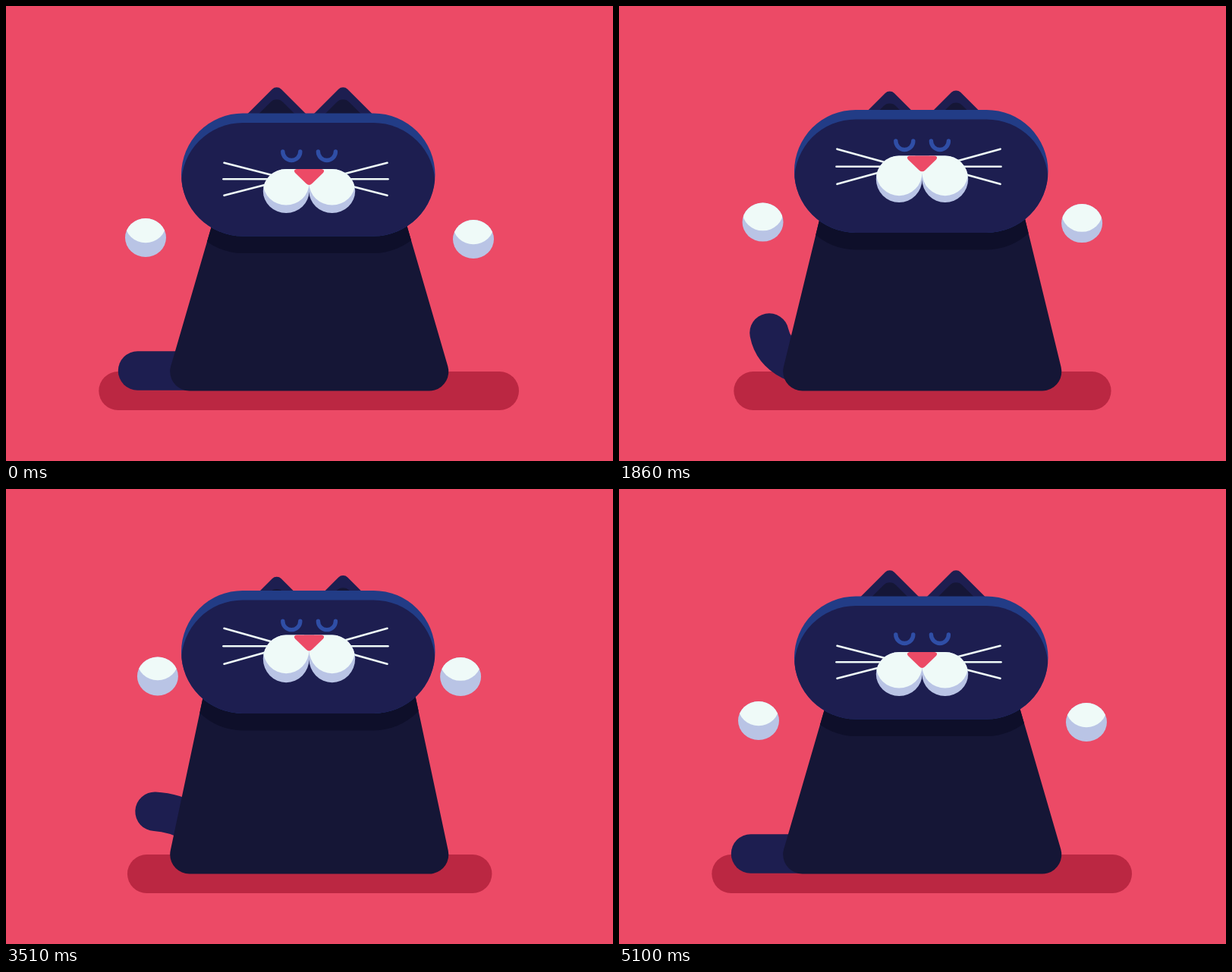
Animation of 800x600 px, one loop 5130 ms. Source, as an HTML page with a canvas:

```html
<!DOCTYPE html>
<html lang="en">
<head>
<meta charset="utf-8">
<title>Meditating cat</title>
<style>
  html, body { margin: 0; width: 100%; height: 100%; overflow: hidden; background: #ec4a66; }
  canvas { display: block; width: 800px; height: 600px; }
</style>
</head>
<body>
<canvas id="stage"></canvas>
<script>
const LOOP = 5130, STEP = 30;
const C = {
  bg: '#ec4a66', floor: '#bb2742', body: '#151636', neck: '#0e0f2a', fur: '#1d1e50',
  rim: '#223c86', eye: '#2f4ea6', white: '#effaf8', lilac: '#b9c4e5'
};

const canvas = document.getElementById('stage');
const g = canvas.getContext('2d');
const ratio = window.devicePixelRatio || 1;
canvas.width = 800 * ratio;
canvas.height = 600 * ratio;

// Eased value between up/down turning points
function track(times, values, t) {
  let i = 0;
  while (i < times.length - 1 && t >= times[i + 1]) i++;
  if (i === times.length - 1) return values[i];
  const u = (t - times[i]) / (times[i + 1] - times[i]);
  return values[i] + (values[i + 1] - values[i]) * u * u * (3 - 2 * u);
}

const BREATH = [0, 1275, 2525, 3745, 4970];
const FACE = [0, 1375, 2595, 3835, 5070];
const PAWS = [0, 1130, 2330, 3630, 4930];
const WAVE = [0, 1, 0, 1, 0];
const FLOOR = [122.3, 162.3, 138, 162.3, 122.3];

const breath = t => track(BREATH, WAVE, t);
const face = t => track(FACE, WAVE, t);
const paws = t => track(PAWS, WAVE, t);
const speed = (fn, t) => (fn(Math.min(t + 10, LOOP)) - fn(Math.max(t - 10, 0))) / 20;

// time, tip x/y, outer handle x/y, inner handle x/y
const TAIL = [
  [0, 173.5, 481, 215, 481, 255, 481],
  [500, 177, 459, 206, 441, 246, 441],
  [990, 198, 419, 238, 424, 270, 450],
  [1400, 207, 410, 221, 440, 245, 472],
  [1860, 198, 431, 204, 462, 235, 481],
  [2370, 174, 467.5, 215, 472.5, 258, 479],
  [2540, 173.5, 476, 215, 477, 256, 480],
  [3060, 176, 459, 205, 440, 245, 440],
  [3540, 197, 425, 234, 427, 262, 449],
  [4020, 203.5, 426, 207, 460, 235, 481],
  [4500, 184, 455, 206, 474, 245, 481],
  [4980, 173.5, 481, 215, 481, 255, 481],
  [5130, 173.5, 481, 215, 481, 255, 481]
];

// Cubic Hermite through the tail poses
function tailPose(t) {
  let i = 0;
  while (i < TAIL.length - 2 && t >= TAIL[i + 1][0]) i++;
  const a = TAIL[i], b = TAIL[i + 1];
  const h = b[0] - a[0], u = (t - a[0]) / h;
  const slope = (k, c) => {
    const p = TAIL[k - 1], n = TAIL[k + 1], m = TAIL[k];
    if (!p || !n || (m[c] - p[c]) * (n[c] - m[c]) <= 0) return 0;
    return (n[c] - p[c]) / (n[0] - p[0]);
  };
  const u2 = u * u, u3 = u2 * u;
  return [1, 2, 3, 4, 5, 6].map(c =>
    a[c] * (2 * u3 - 3 * u2 + 1) + b[c] * (3 * u2 - 2 * u3) +
    slope(i, c) * h * (u3 - 2 * u2 + u) + slope(i + 1, c) * h * (u3 - u2));
}

function shape(color, draw) {
  g.beginPath();
  draw();
  g.fillStyle = color;
  g.fill();
}

function clipped(clip, draw) {
  g.save();
  g.beginPath();
  clip();
  g.clip();
  draw();
  g.restore();
}

function line(color, width, draw) {
  g.beginPath();
  draw();
  g.strokeStyle = color;
  g.lineWidth = width;
  g.lineCap = 'round';
  g.stroke();
}

function capsule(x1, y1, x2, y2) {
  const r = (y2 - y1) / 2, y = y1 + r;
  g.moveTo(x1 + r, y1);
  g.lineTo(x2 - r, y1);
  g.arc(x2 - r, y, r, -Math.PI / 2, Math.PI / 2);
  g.lineTo(x1 + r, y2);
  g.arc(x1 + r, y, r, Math.PI / 2, Math.PI * 1.5);
  g.closePath();
}

function oval(x, y, rx, ry) {
  g.moveTo(x + rx, y);
  g.ellipse(x, y, rx, ry, 0, 0, Math.PI * 2);
}

function drawFloor(t) {
  const left = track(BREATH, FLOOR, t);
  shape(C.floor, () => capsule(left, 482, 676 - 0.945 * (left - 122.3), 533));
}

function drawTail(t) {
  const [x, y, ax, ay, bx, by] = tailPose(t);
  line(C.fur, 51.5, () => {
    g.moveTo(x, y);
    g.bezierCurveTo(ax, ay, bx, by, 300, 481);
  });
}

function drawBody(p, headTop) {
  const lean = Math.atan(0.291 - 0.087 * p), r = 25.5, cy = 482, top = 220;
  const tx = 241.7 - r * Math.cos(lean), ty = cy - r * Math.sin(lean);
  const topX = tx + (ty - top) * Math.tan(lean);
  const outline = () => {
    g.moveTo(topX, top);
    g.lineTo(799.5 - topX, top);
    g.arc(557.8, cy, r, -lean, Math.PI / 2);
    g.arc(241.7, cy, r, Math.PI / 2, Math.PI + lean);
    g.closePath();
  };
  shape(C.body, outline);
  clipped(outline, () => shape(C.neck, () => capsule(231, headTop + 22.5, 565.5, headTop + 184.5)));
}

function peak(x, y, size, r) {
  g.moveTo(x - size, y + size);
  g.arcTo(x, y, x + size, y + size, r);
  g.lineTo(x + size, y + size);
  g.closePath();
}

function drawEar(x, drop) {
  shape(C.fur, () => peak(x, 103.7 + drop, 50, 8.5));
  shape(C.body, () => peak(x, 118.6 + drop, 40, 11.5));
}

function drawHead(top) {
  const outline = () => capsule(231, top, 565.5, top + 162);
  shape(C.rim, outline);
  clipped(outline, () => shape(C.fur, () => capsule(231, top + 12.5, 565.5, top + 174.5)));
}

function drawEye(x, y) {
  line(C.eye, 5.4, () => g.arc(x, y, 11.5, Math.PI, 0, true));
}

function drawWhiskers(t, q) {
  const u = (t - 3870) / 300;
  const tilt = u > 0 && u < 1 ? -0.0183 * Math.sin(Math.PI * u) : 0;
  const spread = 21.5 + 2.4 * q;
  g.save();
  g.translate(395, 228.3 - 25.4 * q);
  g.rotate(tilt);
  for (const side of [-1, 1]) {
    for (const k of [-1, 0, 1]) {
      line(C.white, 2.6, () => {
        g.moveTo(side * (k ? 107.5 : 108.5), k * spread);
        g.lineTo(side * 24, 0);
      });
    }
  }
  g.restore();
}

function drawMuzzle(t, q) {
  const top = 215 - 27 * q, ry = 29 + 2.75 * q, cy = top + ry;
  const lift = 10.6 + 55 * 27 * speed(face, t);
  const outline = () => {
    oval(369.2, cy, 30.4, ry);
    oval(429.8, cy, 30.4, ry);
    g.rect(369.2, top, 60.6, ry);
  };
  shape(C.lilac, outline);
  clipped(outline, () => shape(C.white, () => {
    oval(369.2, cy - lift, 30.4, ry);
    oval(429.8, cy - lift, 30.4, ry);
    g.rect(369.2, top, 60.6, ry - lift);
  }));
  g.save();
  g.translate(399.5, top);
  shape(C.bg, () => {
    g.moveTo(-16.5, 0);
    g.lineTo(16.5, 0);
    g.quadraticCurveTo(21.5, 1, 18.5, 5);
    g.lineTo(4, 19);
    g.quadraticCurveTo(0, 22.8, -4, 19);
    g.lineTo(-18.5, 5);
    g.quadraticCurveTo(-21.5, 1, -16.5, 0);
  });
  g.restore();
}

function drawPaw(x, y, lift) {
  const outline = () => oval(x, y, 27, 25.5);
  shape(C.lilac, outline);
  clipped(outline, () => shape(C.white, () => oval(x, y - lift, 27, 25.5)));
}

function draw(t) {
  const p = breath(t), q = face(t), w = paws(t);
  const headTop = 141.5 - 8.4 * p;
  const lift = 18.7 + 62 * 60 * speed(paws, t);

  g.setTransform(ratio, 0, 0, ratio, 0, 0);
  g.fillStyle = C.bg;
  g.fillRect(0, 0, 800, 600);

  drawFloor(t);
  drawTail(t);
  drawBody(p, headTop);
  drawEar(356.8, 9.5 * p);
  drawEar(444.2, 7.6 * p);
  drawHead(headTop);
  drawEye(376.3, 192 - 21.5 * q);
  drawEye(422.9, 192 - 21.5 * q);
  drawWhiskers(t, q);
  drawMuzzle(t, q);
  drawPaw(184 + 16.3 * w, 305.5 - 60 * w, lift);
  drawPaw(616 - 17.3 * w, 307.5 - 61.5 * w, lift);
}

const start = performance.now();
function tick() {
  const t = (performance.now() - start) % LOOP;
  draw(Math.floor(t / STEP) * STEP);
  requestAnimationFrame(tick);
}
tick();
</script>
</body>
</html>
```
